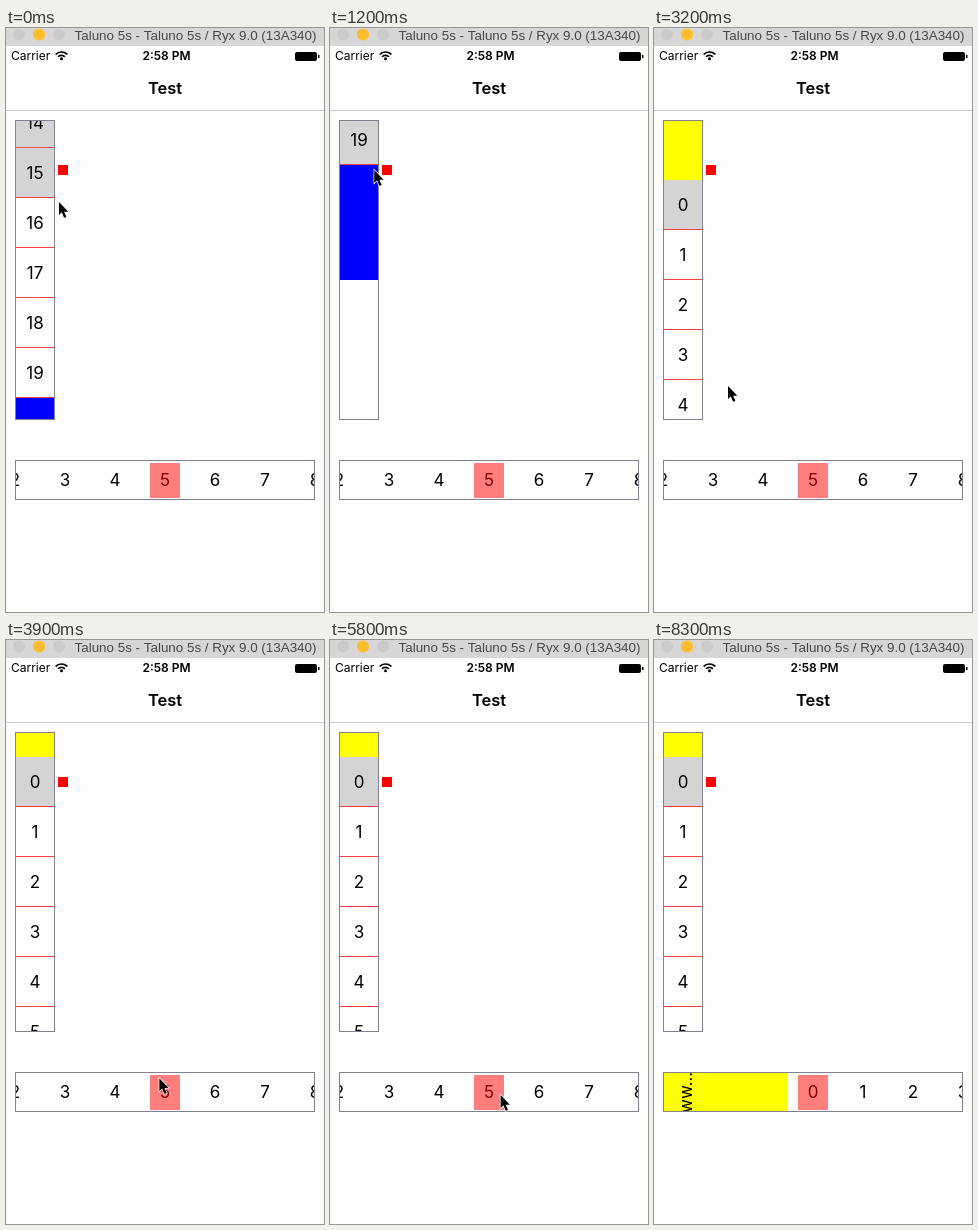
Write an HTML page with a canvas that moves like this. It is 318 by 584 pixels and loops after 8.4 s.

```html
<!DOCTYPE html>
<html lang="en">
<head>
<meta charset="utf-8">
<title>Snapping lists</title>
<style>
html, body { margin: 0; width: 100%; height: 100%; overflow: hidden; background: #fdfdfd; }
canvas { display: block; }
</style>
</head>
<body>
<canvas id="stage" width="318" height="584"></canvas>
<script>
const ctx = document.getElementById('stage').getContext('2d');
const LOOP = 8400, STEP = 100, CELL = 50, COUNT = 20, PICK_Y = 142;
const UI = 'Inter, Roboto, sans-serif';
const DIGITS = `17px ${UI}`;
const PAPER = '#fdfdfd', BORDER = '#80808f', SHADE = '#d4d4d4', YELLOW = '#ffff00';

// Progress of a decelerating move between two times.
function glide(time, start, end) {
  const left = 1 - Math.max(0, Math.min(1, (time - start) / (end - start)));
  return 1 - left * left;
}

// Centre of row 0: fling to the end, fling back past the start, settle.
const firstRow = t => -521 - 317 * glide(t, -200, 1200)
  + 1015 * glide(t, 1200, 2850) - 35 * glide(t, 3200, 3700);

// Centre of column 0: a short swing, then a drag to the start.
const firstColumn = t => -91 + 83 * (glide(t, 3900, 4400) - glide(t, 4400, 5700))
  + 250 * glide(t, 6600, 8000);

const pointerX = t => 53 - 11 * glide(t, 0, 2200) + 32 * glide(t, 2200, 3200)
  + 96 * glide(t, 3200, 4400) - 165 * glide(t, 4400, 4800)
  + 229 * glide(t, 4900, 6800) + 96 * glide(t, 6800, 7700);
const pointerY = t => 174 - 32 * glide(t, 0, 1200) + 28 * glide(t, 1200, 2200)
  + 188 * glide(t, 2200, 3200) + 97 * glide(t, 3200, 4400) - 485 * glide(t, 7200, 7700);

function rect(x, y, w, h, color) {
  ctx.fillStyle = color;
  ctx.fillRect(x, y, w, h);
}

function text(str, x, y, font, color = '#000', align = 'center') {
  ctx.font = font;
  ctx.fillStyle = color;
  ctx.textAlign = align;
  ctx.fillText(str, x, y);
}

function disc(x, y, r, color) {
  ctx.fillStyle = color;
  ctx.beginPath();
  ctx.arc(x, y, r, 0, Math.PI * 2);
  ctx.fill();
}

function boxed(x, y, w, h, draw) {
  ctx.save();
  ctx.beginPath();
  ctx.rect(x, y, w, h);
  ctx.clip();
  draw();
  ctx.restore();
  ctx.strokeStyle = BORDER;
  ctx.lineWidth = 1;
  ctx.strokeRect(x + .5, y + .5, w - 1, h - 1);
}

function drawChrome() {
  rect(0, 0, 318, 584, PAPER);
  rect(0, 0, 318, 18, '#d6d6d6');
  ['#cbcbcb', '#ffbd2e', '#cbcbcb'].forEach((c, i) => disc(13 + 20 * i, 6.5, 6, c));
  text('Taluno 5s - Taluno 5s / Ryx 9.0 (13A340)', 189.5, 12,
    '13.4px "Liberation Sans", Arial, sans-serif', '#484848');
  text('Carrier', 5, 32, `12px ${UI}`, '#000', 'left');
  text('2:58 PM', 160.5, 32, `600 12px ${UI}`);
  text('Test', 159, 66, `600 16.5px ${UI}`);

  ctx.strokeStyle = '#000';
  ctx.lineWidth = 1.7;
  for (const r of [4.7, 8]) {
    ctx.beginPath();
    ctx.arc(55.5, 32, r, -Math.PI * .76, -Math.PI * .24);
    ctx.stroke();
  }
  disc(55.5, 30.7, 1.5, '#000');
  ctx.beginPath();
  ctx.roundRect(289, 24, 22, 9, 2);
  ctx.fill();
  rect(312, 27, 1.5, 3, '#000');
  rect(0, 82, 318, 1, '#ceced9');
}

function pickedRow(time) {
  const row = Math.round((PICK_Y - firstRow(time)) / CELL);
  return Math.max(0, Math.min(COUNT - 1, row));
}

function drawRows(time) {
  const first = firstRow(time);
  // The previous selection stays lit for one step.
  const lit = [pickedRow(time), pickedRow(time - STEP)];
  boxed(9, 92, 40, 300, () => {
    rect(9, first - 140, 40, 115, YELLOW);
    rect(9, first + COUNT * CELL - 25, 40, 115, '#0000ff');
    for (let i = 0; i < COUNT; i++) {
      const y = first + i * CELL;
      if (lit.includes(i)) rect(9, y - 25, 40, CELL, SHADE);
      text(i, 29, y + 6, DIGITS);
      rect(9, Math.floor(y + 24.5), 40, 1, '#f04040');
    }
  });
  rect(52, 137, 10, 10, '#ff0000');
}

function drawColumns(time) {
  const first = firstColumn(time);
  boxed(9, 432, 300, 40, () => {
    rect(first - 325, 432, 300, 40, YELLOW);
    ctx.save();
    ctx.translate(first - 121, 473);
    ctx.rotate(-Math.PI / 2);
    text('ww…', 0, 0, DIGITS, '#000', 'left');
    ctx.restore();
    for (let i = 0; i < COUNT; i++) text(i, first + i * CELL, 458, DIGITS);
    rect(144, 435, 30, 35, 'rgba(255, 0, 0, .5)');
  });
}

function drawPointer(time) {
  ctx.save();
  ctx.translate(pointerX(time), pointerY(time));
  ctx.scale(.93, .93);
  const arrow = new Path2D('M0 0V14L3 11L5.5 17L8 16L5.5 10.5H10Z');
  ctx.strokeStyle = '#fff';
  ctx.lineWidth = 1.5;
  ctx.stroke(arrow);
  ctx.fillStyle = '#000';
  ctx.fill(arrow);
  ctx.restore();
}

function frame() {
  const time = Math.floor(performance.now() % LOOP / STEP) * STEP;
  drawChrome();
  drawRows(time);
  drawColumns(time);
  drawPointer(time);
  requestAnimationFrame(frame);
}
frame();
</script>
</body>
</html>
```
